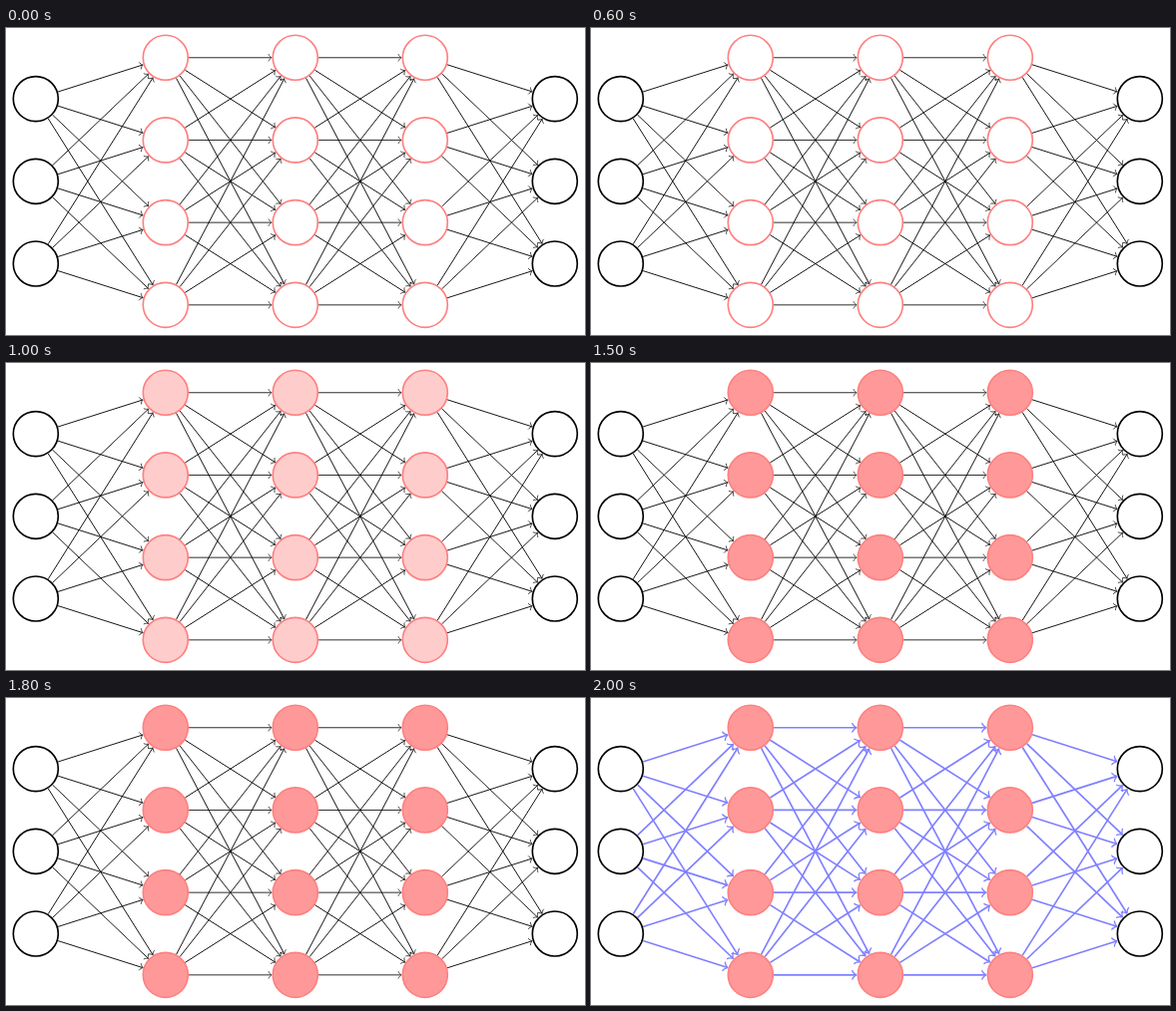
Recreate the animation shown at these times as an HTML page with a canvas. Size 580 by 308 pixels, loop 2.5 s.

```html
<!DOCTYPE html>
<html lang="en">
<head>
<meta charset="utf-8">
<title>Neural network</title>
<style>
  html, body { margin: 0; width: 100%; height: 100%; overflow: hidden; background: #fff; }
  canvas { display: block; width: 580px; height: 308px; }
</style>
</head>
<body>
<canvas id="stage"></canvas>
<script>
const canvas = document.getElementById('stage');
const ctx = canvas.getContext('2d');
const ratio = window.devicePixelRatio || 1;
canvas.width = 580 * ratio;
canvas.height = 308 * ratio;
ctx.scale(ratio, ratio);

const LOOP = 2500, RADIUS = 22.5, THIN = 0.83, THICK = 1.66;
const BORDER = RADIUS + THICK / 2;

const layers = [3, 4, 4, 4, 3].map((count, col) =>
  Array.from({ length: count }, (_, row) => ({
    x: 289.8 + (col - 2) * 130,
    y: 153.8 + (row - (count - 1) / 2) * 82.7
  })));

function drawNode({ x, y }, stroke, fill) {
  ctx.beginPath();
  ctx.arc(x, y, RADIUS, 0, 2 * Math.PI);
  ctx.fillStyle = fill;
  ctx.fill();
  ctx.strokeStyle = stroke;
  ctx.lineWidth = THICK;
  ctx.stroke();
}

function drawArrow(from, to, color, width) {
  const dx = to.x - from.x, dy = to.y - from.y;
  const headWidth = 0.8 * width;
  const a = 0.58 + 0.3 * width; // unit of the arrowhead
  const tip = Math.hypot(dx, dy) - BORDER - headWidth / 2;
  const base = tip - 0.75 * a;

  ctx.save();
  ctx.translate(from.x, from.y);
  ctx.rotate(Math.atan2(dy, dx));
  ctx.strokeStyle = color;
  ctx.lineWidth = width;
  ctx.beginPath();
  ctx.moveTo(BORDER, 0);
  ctx.lineTo(base, 0);
  ctx.stroke();

  ctx.translate(base, 0);
  ctx.lineWidth = headWidth;
  ctx.lineCap = ctx.lineJoin = 'round';
  ctx.beginPath();
  ctx.moveTo(-3 * a, -4 * a);
  ctx.bezierCurveTo(-2.75 * a, -2.5 * a, 0, -0.25 * a, 0.75 * a, 0);
  ctx.bezierCurveTo(0, 0.25 * a, -2.75 * a, 2.5 * a, -3 * a, 4 * a);
  ctx.stroke();
  ctx.restore();
}

function draw(now) {
  const t = now % LOOP;
  const fill = t < 1000 ? '#fff' : t < 1500 ? '#fcc' : '#f99';
  const active = t >= 2000;

  ctx.fillStyle = '#fff';
  ctx.fillRect(0, 0, 580, 308);
  layers.forEach((layer, col) => {
    const hidden = col > 0 && col < 4;
    for (const node of layer) drawNode(node, hidden ? '#ff8080' : '#000', hidden ? fill : '#fff');
  });
  layers.slice(1).forEach((layer, col) => {
    for (const from of layers[col])
      for (const to of layer)
        drawArrow(from, to, active ? '#8080ff' : '#000', active ? THICK : THIN);
  });
}

let start;
function tick(now) {
  start ??= now;
  draw(now - start);
  requestAnimationFrame(tick);
}
draw(0);
requestAnimationFrame(tick);
</script>
</body>
</html>
```
